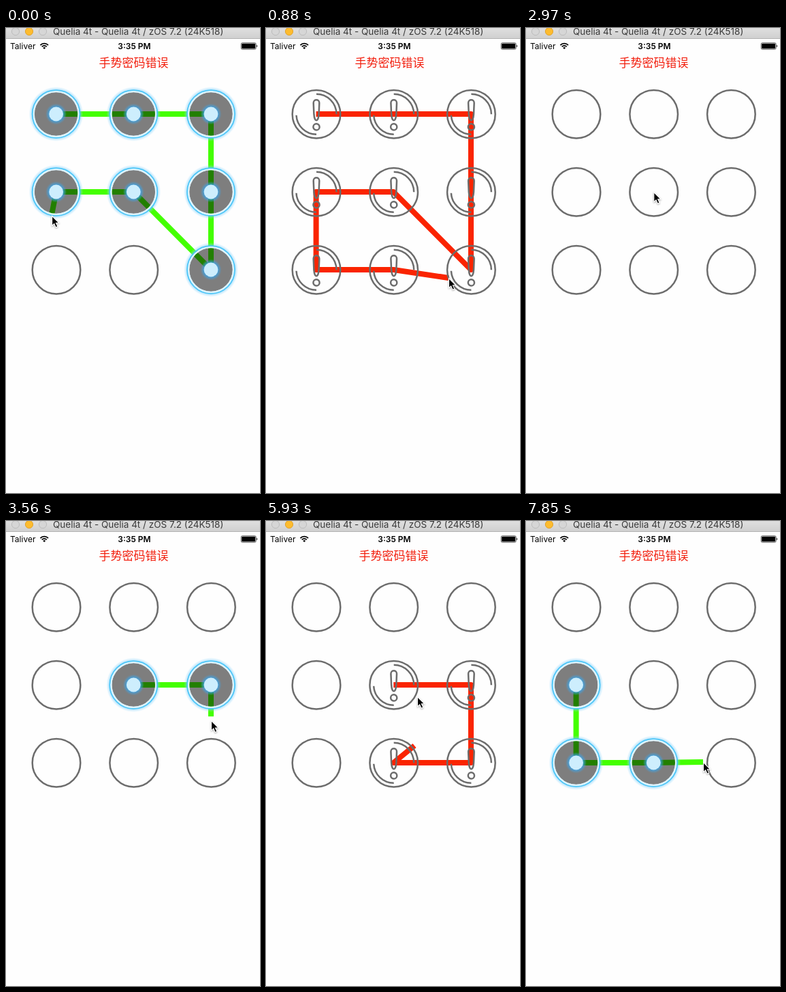
These frames come from a looping animation (373x681 px, 8000 ms). An HTML page:

```html
<!DOCTYPE html>
<html lang="zh">
<head>
<meta charset="utf-8">
<title>Gesture lock</title>
<style>
  html, body { margin: 0; width: 100%; height: 100%; overflow: hidden; background: #fefefe; }
  svg { display: block; width: 100vw; height: 100vh; }
  text { font-family: Inter, Roboto, sans-serif; white-space: pre; }
  #warn { font: 17px "Noto Sans CJK SC", "Noto Sans CJK", sans-serif; fill: #f21d0c; }
  .pen { fill: none; stroke: #6c6c6c; stroke-width: 2.5; }
</style>
</head>
<body>
<svg viewBox="0 0 373 681">
  <defs>
    <linearGradient id="bar" x2="0" y2="1">
      <stop offset="0" stop-color="#dfdfdf"/><stop offset="1" stop-color="#d0d0d0"/>
    </linearGradient>
    <radialGradient id="halo">
      <stop offset=".8" stop-color="#52c6fb" stop-opacity="0"/>
      <stop offset=".84" stop-color="#52c6fb" stop-opacity=".75"/>
      <stop offset=".92" stop-color="#7fd0fa" stop-opacity=".4"/>
      <stop offset="1" stop-color="#9adcff" stop-opacity="0"/>
    </radialGradient>
    <radialGradient id="core">
      <stop offset=".62" stop-color="#3da4e6" stop-opacity=".95"/>
      <stop offset="1" stop-color="#3da4e6" stop-opacity="0"/>
    </radialGradient>
    <g id="idle" class="pen"><circle cx=".4" cy=".2" r="35.3"/></g>
    <g id="bad" class="pen">
      <g transform="translate(.4 .2)">
        <circle r="35.3"/>
        <path d="M0-29.5A29.5 29.5 0 0 1 29.5 0M0 29.5A29.5 29.5 0 0 1-29.5 1.5"/>
        <path d="M-4.3-16.5C-4.3-22.5 4.3-22.5 4.3-16.5L3.6 0C2.8 12-2.8 12-3.6 0Z"/>
        <circle cy="18.7" r="4.6"/>
      </g>
    </g>
    <g id="lit">
      <circle r="40" fill="url(#halo)"/>
      <circle r="32" fill="#000" fill-opacity=".5"/>
      <circle r="33" fill="none" stroke="#dcf4ff" stroke-width="2.6"/>
      <circle r="35" fill="none" stroke="#48c5f8" stroke-width="1.6"/>
      <circle r="15.5" fill="url(#core)"/>
      <circle r="10.4" fill="#cdeefd"/>
    </g>
  </defs>

  <rect width="373" height="681" fill="#fefefe"/>
  <rect width="373" height="15" fill="url(#bar)"/>
  <rect y="15" width="373" height="1" fill="#b3b3b3"/>
  <g fill="#d6d6d6" stroke="#bcbcbc">
    <circle cx="14" cy="5" r="5.6"/>
    <circle cx="34" cy="5" r="5.6" fill="#fdbc2f" stroke="#e2a32c"/>
    <circle cx="54" cy="5" r="5.6"/>
  </g>
  <text x="69" y="10" font-size="13.5" fill="#3a3a3a">Quelia 4t - Quelia 4t / zOS 7.2 (24K518)</text>

  <text x="6" y="31" font-size="12">Taliver</text>
  <g fill="none" stroke="#000" stroke-width="1.8">
    <path d="M50.4 25.2A8 8 0 0 1 62 25.2M52.7 27.4A4.8 4.8 0 0 1 59.7 27.4"/>
    <path d="M56.2 31L54.2 29A2.8 2.8 0 0 1 58.2 29Z" fill="#000" stroke="none"/>
  </g>
  <text x="188.5" y="31" font-size="12" font-weight="600" text-anchor="middle">3:35 PM</text>
  <rect x="345.2" y="21.7" width="22" height="9.6" rx="2" fill="none" stroke="#000" stroke-width=".6"/>
  <rect x="346.2" y="22.7" width="20" height="7.6" rx="1"/>
  <path d="M368.2 24.8Q370.2 26.5 368.2 28.3Z"/>

  <text id="warn" y="57.3" text-anchor="middle">手势密码错误</text>
  <polyline id="line" fill="none" stroke-width="8" stroke-linejoin="round"/>
  <g id="grid"></g>
  <path id="arrow" d="M0 0V14.2L3.2 11.3 5.6 16.8 8.3 15.6 5.9 10.3H10.3Z"
    stroke="#fff" stroke-width="1.1" style="filter:drop-shadow(0 1px 1px #0005)"/>
</svg>

<script>
const LOOP = 8000, TICKS = 54, STEP = LOOP / TICKS, REACH = 35;
const $ = id => document.getElementById(id);
const centre = i => [73.6 + 113.7 * (i % 3), 126 + 114 * Math.floor(i / 3)];

// Times are in ticks; a stop is a dot's index or a free point.
// Each move starts where the one before it stopped.
const moves = [
  { begin: -10.3, end: 3, press: true, fail: 6, kick: -6,
    stops: [0, 1, 2, 5, 8, 4, 3, [67, 274], 6, 7, [268, 366]] },
  { begin: 15, end: 20, stops: [[255, 303], 4] },
  { begin: 20, end: 28, press: true, fail: 28, kick: 6, stops: [5, 8, 7, [218, 329]] },
  { begin: 28, end: 33, stops: [[222, 257]] },
  { begin: 40, end: 47, stops: [[48, 238]] },
  { begin: 47, end: 53, press: true, stops: [3, 6, 7, [260, 353]] }
];

// Give every stop its place and its distance along the route.
let from = 0;
for (const m of moves) {
  let dist = 0, prev;
  m.route = [from, ...m.stops].map(stop => {
    const at = Array.isArray(stop) ? stop : centre(stop);
    if (prev) dist += Math.hypot(at[0] - prev[0], at[1] - prev[1]);
    prev = at;
    return { stop, at, dist };
  });
  m.length = dist;
  from = m.stops.at(-1);
}

const progress = (m, k) => Math.min(1, (k - m.begin) / (m.end - m.begin));

function travelled(m, k) {
  const u = progress(m, k);
  return m.length * (m.press ? u ** 1.2 : 1 - (1 - u) ** 2.4);
}

function along({ route }, d) {
  const n = Math.max(1, route.findIndex(p => p.dist >= d - 1e-6));
  const a = route[n - 1], b = route[n];
  const f = b.dist > a.dist ? (d - a.dist) / (b.dist - a.dist) : 0;
  return a.at.map((v, i) => v + (b.at[i] - v) * f);
}

const dots = Array.from({ length: 9 }, (_, i) => {
  const use = document.createElementNS("http://www.w3.org/2000/svg", "use");
  use.setAttribute("transform", `translate(${centre(i)})`);
  return $("grid").appendChild(use);
});

function draw(k) {
  const begun = moves.filter(m => m.begin <= k);
  const move = begun.at(-1), stroke = begun.filter(m => m.press).at(-1);

  const d = travelled(stroke, k);
  const picked = stroke.route.filter(p =>
    !Array.isArray(p.stop) && d > 0 && d >= p.dist - REACH);
  const pts = picked.map(p => p.at);
  // the line trails the pointer and catches up as it stops
  const lag = 12 * (1 - progress(stroke, k));
  if (pts.length) pts.push(along(stroke, Math.max(0, d - lag)));

  const since = k - stroke.fail, failed = since >= 0;
  $("line").setAttribute("points", pts.join(" "));
  $("line").setAttribute("stroke", failed ? "#fa2400" : "#44ff00");
  dots.forEach((dot, i) => dot.setAttribute("href",
    !picked.some(p => p.stop === i) ? "#idle" : failed ? "#bad" : "#lit"));

  const shake = failed && since < 3 ? stroke.kick * Math.cos(2 * since) ** 2 : 0;
  $("warn").setAttribute("x", 187.5 + shake);

  const [x, y] = along(move, travelled(move, k));
  $("arrow").setAttribute("transform", `translate(${x + .5} ${y + .5})`);
}

let last = -1;
function frame() {
  const t = performance.now() % LOOP;
  const k = Math.min(TICKS - 1, Math.floor((t + 9) / STEP));
  if (k !== last) draw(last = k);
  requestAnimationFrame(frame);
}
frame();
</script>
</body>
</html>
```
